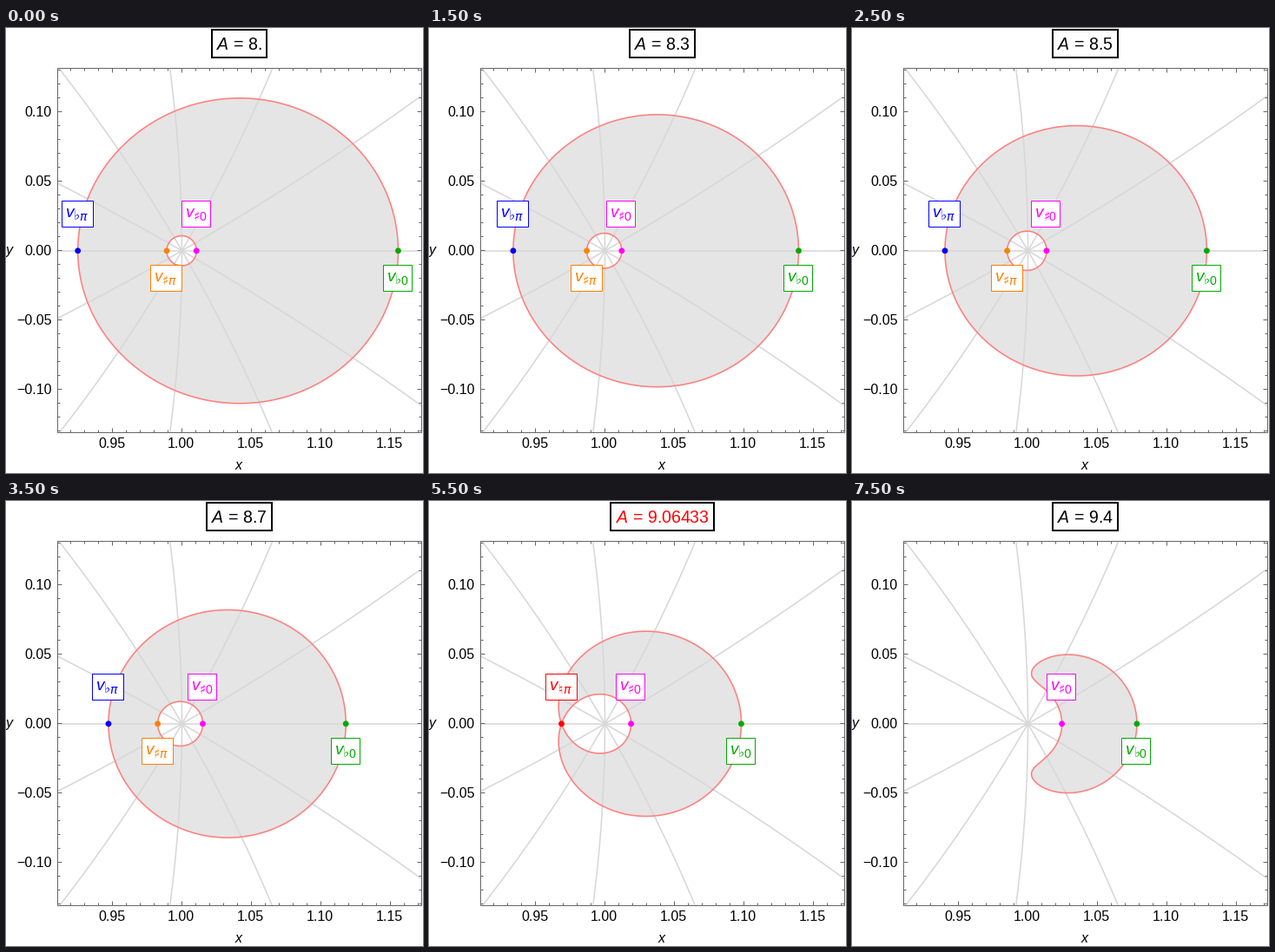
Recreate the animation shown at these times as a matplotlib script. Size 480x513 px, loop 8000 ms.

```python
import numpy as np
import matplotlib.pyplot as plt
from matplotlib.animation import FuncAnimation
from matplotlib.patches import Circle, PathPatch, Rectangle
from matplotlib.path import Path

plt.rcParams.update({
    "font.family": "Liberation Sans",
    "mathtext.fontset": "custom",
    "mathtext.rm": "Liberation Sans",
    "mathtext.it": "Liberation Sans:italic",
})

W, H = 480, 513
X0, Y0, SCALE = 202.5, 256.8, 1600      # pixel position of (1, 0), pixels per unit
LEFT, TOP, RIGHT, BOTTOM = 59, 46, 478, 466
TITLE_X = 268.5
TAG_HIGH, TAG_LOW = 199, 273            # top edges of the two rows of tags
FRAME = "#666666"
BLUE, ORANGE, MAGENTA = "#0000ff", "#ff8000", "#ff00ff"
GREEN, RED = "#00aa00", "#ff0000"

PINCH = 9.06433                         # the ring opens at this value
CREST = (PINCH + 0.312, 0.338, 0.026)   # highest A along a ray, in powers of cos
VALUES = [8 + 0.1 * i for i in range(11)] + [PINCH] + [9.1, 9.2, 9.3, 9.4]

# One point per pixel: sizes below are all in pixels.
fig = plt.figure(figsize=(W / 72, H / 72), dpi=72, facecolor="white")
ax = fig.add_axes([0, 0, 1, 1])
ax.set_xlim(0, W)
ax.set_ylim(H, 0)
ax.axis("off")


def radii(a, theta):
    """Inner and outer boundary radius around (1, 0), in pixels."""
    c = np.cos(theta)
    depth = np.maximum(CREST[0] + CREST[1] * c + CREST[2] * c**2 - a, 0)
    w2 = depth * (0.87 + 0.0775 * c + 0.0375 * c**2 + 0.037 * depth)
    mid = 4.06 + 0.178 * c + 0.03 * c**2
    mid = mid - (0.067 - 0.0195 * c + 0.0085 * c**2) * w2
    w = np.sqrt(w2)
    return np.exp(mid - w), np.exp(mid + w)


def polar(r, theta):
    return np.column_stack([X0 + r * np.cos(theta), Y0 - r * np.sin(theta)])


def closed(pts):
    return Path(np.vstack([pts, pts[:1]]), closed=True)


def region(a):
    if a <= PINCH:
        theta = np.linspace(-np.pi, np.pi, 401)
        inner, outer = radii(a, theta)
        return Path.make_compound_path(closed(polar(outer, theta)),
                                       closed(polar(inner, theta)[::-1]))
    k0, k1, k2 = CREST
    tip = np.arccos((-k1 + np.sqrt(k1**2 - 4 * k2 * (k0 - a))) / (2 * k2))
    theta = tip * np.sin(np.linspace(-np.pi / 2, np.pi / 2, 301))
    inner, outer = radii(a, theta)
    return closed(np.vstack([polar(outer, theta), polar(inner, theta)[::-1]]))


def write(x, y, s, size=16, **kw):
    return ax.text(x, y, s, fontsize=size, va="baseline", **kw)


class Tag:
    """Dot on the axis with a framed symbol above or below it."""

    def __init__(self, mark, sub, color, top):
        self.w = 36 if sub == "π" else 33
        self.dot = ax.add_patch(Circle((0, Y0), 3.4, fc=color, ec="none", zorder=6))
        self.box = ax.add_patch(Rectangle((0, top), self.w, 30, fc="white",
                                          ec=color, lw=1, zorder=7))
        kw = dict(color=color, zorder=8)
        sub_kw = dict(family="DejaVu Sans", style="italic") if sub == "π" else {}
        self.glyphs = [
            (5, write(0, top + 19.5, "v", 19, style="italic", **kw)),
            (17.5, write(0, top + 22.5, mark, 15, family="DejaVu Sans", ha="center", **kw)),
            (20.5, write(0, top + 22.5, sub, 14, **sub_kw, **kw)),
        ]
        self.parts = [self.dot, self.box] + [g for _, g in self.glyphs]

    def place(self, x, shown=True):
        self.dot.center = (x, Y0)
        left = x - self.w / 2 - 1
        self.box.set_x(left)
        for dx, glyph in self.glyphs:
            glyph.set_x(left + dx)
        for part in self.parts:
            part.set_visible(shown)


def draw_grid():
    clip = Rectangle((LEFT, TOP), RIGHT - LEFT, BOTTOM - TOP, transform=ax.transData)
    t = np.linspace(-0.4, 0.4, 201)
    for deg in range(0, 180, 30):
        w = t * np.exp(1j * np.radians(deg))
        z = w / (1 - w / 2)
        line, = ax.plot(X0 + SCALE * z.real, Y0 - SCALE * z.imag,
                        color="#d8d8d8", lw=1.6, zorder=2)
        line.set_clip_path(clip)


def draw_frame():
    def tick(xs, ys):
        ax.plot(xs, ys, color=FRAME, lw=1, zorder=5, solid_capstyle="butt")

    # Whole coordinates snap to the centre of their pixel.
    ax.add_patch(Rectangle((LEFT, TOP), RIGHT - LEFT, BOTTOM - TOP,
                           fill=False, ec=FRAME, lw=1, zorder=5))
    for k in range(-8, 18):
        x, n = int(X0) + 16 * k, 3 if k % 5 else 5
        tick([x, x], [TOP, TOP + n])
        tick([x, x], [BOTTOM, BOTTOM - n])
        if k % 5 == 0:
            write(x - 0.5, 484.5, f"{1 + k / 100:.2f}", ha="center")
    for k in range(-13, 14):
        y, n = int(Y0) - 16 * k, 3 if k % 5 else 5
        tick([LEFT, LEFT + n], [y, y])
        tick([RIGHT, RIGHT - n], [y, y])
        if k % 5 == 0:
            write(53, y + 5.5, f"{k / 100:.2f}".replace("-", "−"), ha="right")
    write(268, 509, "x", ha="center", style="italic")
    write(4, 261, "y", ha="center", style="italic")


draw_grid()
draw_frame()
fill = ax.add_patch(PathPatch(region(8), fc="#e5e5e5", ec="none", zorder=1))
edge = ax.add_patch(PathPatch(region(8), fc="none", ec="#ff8080", lw=1.6, zorder=3))
flat_pi = Tag("♭", "π", BLUE, TAG_HIGH)
sharp_pi = Tag("♯", "π", ORANGE, TAG_LOW)
natural_pi = Tag("♮", "π", RED, TAG_HIGH)
sharp_0 = Tag("♯", "0", MAGENTA, TAG_HIGH)
flat_0 = Tag("♭", "0", GREEN, TAG_LOW)
title = write(TITLE_X, 25, "", 19.5, ha="center")
title_box = ax.add_patch(Rectangle((0, 2), 1, 31.5, fill=False, ec="black", lw=2))


def update(i):
    a = VALUES[i]
    path = region(a)
    fill.set_path(path)
    edge.set_path(path)

    near, far = radii(a, 0.0)
    sharp_0.place(X0 + near)
    flat_0.place(X0 + far)
    near, far = radii(a, np.pi)
    sharp_pi.place(X0 - near, a < PINCH)
    flat_pi.place(X0 - far, a < PINCH)
    natural_pi.place(X0 - near, a == PINCH)

    num = f"{a:g}"
    title.set_text(f"$A$ = {num if '.' in num else num + '.'}")
    title.set_color(RED if a == PINCH else "black")
    extent = title.get_window_extent(fig.canvas.get_renderer())
    w = extent.transformed(ax.transData.inverted()).width + 10.5
    title_box.set_x(TITLE_X - w / 2)
    title_box.set_width(w)
    return []


anim = FuncAnimation(fig, update, frames=len(VALUES), interval=500,
                     repeat=True, repeat_delay=0, blit=False)
plt.show()
```
